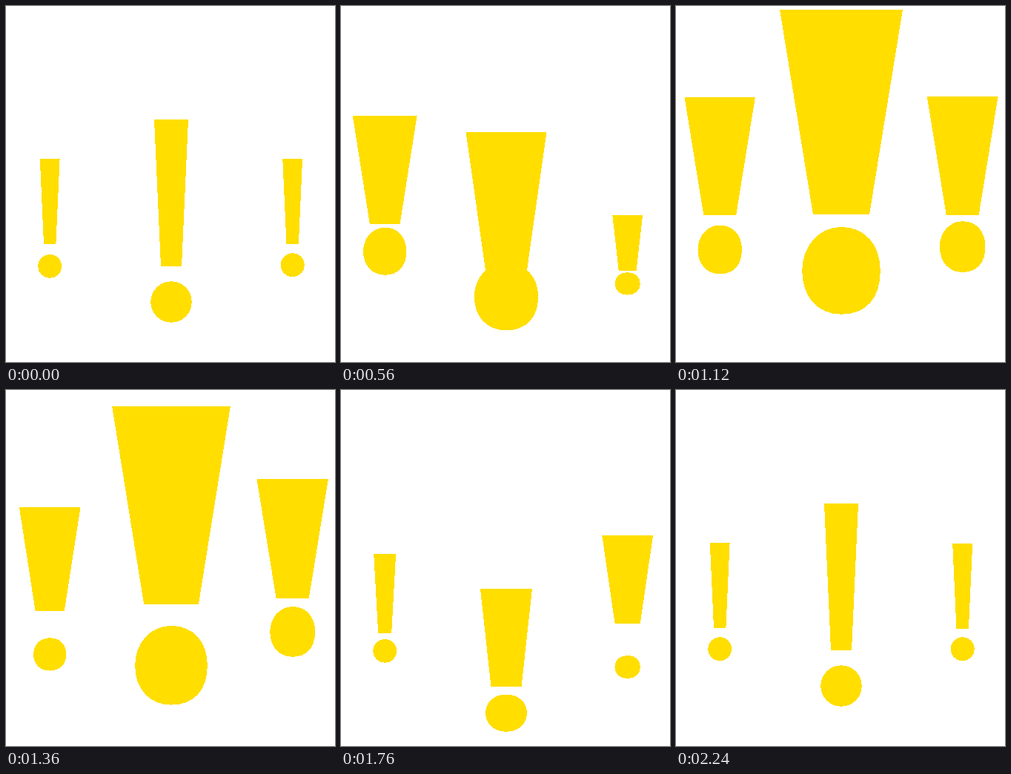
Write an HTML page that moves like this. It is 444 by 480 pixels and loops after 2.32 s.

```html
<!DOCTYPE html>
<html lang="en">
<head>
<meta charset="utf-8">
<title>Bouncing exclamation marks</title>
<style>
  html, body { margin: 0; width: 100%; height: 100%; overflow: hidden; background: #fff; }
  svg { display: block; width: 100%; height: 100%; }
  path { fill: #ffde00; shape-rendering: crispEdges; }
</style>
</head>
<body>
<svg viewBox="0 0 444 480"></svg>
<script>
const LOOP = 2320, STEP = 80, STAGGER = 160, DOT_LEAD = 80;
const SIDE_SCALE = 0.583, SIDE_Y = 116.6;

const bar = {
  rest:   { top: 153, bottom: 351, width: 46, foot: 28 },
  crouch: { top: 283, bottom: 412, width: 70, foot: 41 },
  tall:   { top: 4.7, bottom: 281.2, width: 166, foot: 76 },
  land:   { top: 268, bottom: 400, width: 70, foot: 41 },
  settle: 0
};

const dotCrouch = { y: 447, width: 56, height: 48.6, round: 0.6, lean: 0 };
const dot = {
  rest:   { y: 399, width: 55.5, height: 55.5, round: 0.552, lean: 0 },
  crouch: dotCrouch,
  tall:   { y: 356.2, width: 106, height: 118.3, round: 0.6, lean: 0.035 },
  land:   dotCrouch,
  settle: 0.1
};

// A bounce: wind up, leap, fall, recover. Falling moves speed up, the others slow down.
const moves = [
  { from: "rest",   to: "crouch", start: 0,    end: 240,  falling: true },
  { from: "crouch", to: "tall",   start: 240,  end: 960,  falling: false },
  { from: "tall",   to: "land",   start: 960,  end: 1600, falling: true },
  { from: "land",   to: "rest",   start: 1600, end: 2000, falling: false }
];

const wrap = time => ((time % LOOP) + LOOP) % LOOP;
const mix = (a, b, k) => a + (b - a) * k;

// Cubic Bezier easing with control points (0.33, 0) and (settle, 1).
function easeOut(u, settle) {
  let low = 0, high = 1;
  for (let i = 0; i < 24; i++) {
    const s = (low + high) / 2, r = 1 - s;
    const x = s * r * r + 3 * s * s * r * settle + s * s * s;
    if (x < u) low = s; else high = s;
  }
  return low * low * (3 - 2 * low);
}

function poseAt(part, time) {
  const move = moves.find(({ end }) => time < end);
  if (!move) return part.rest;
  const u = (time - move.start) / (move.end - move.start);
  const k = move.falling ? 1 - easeOut(1 - u, part.settle) : easeOut(u, part.settle);
  const from = part[move.from], to = part[move.to], pose = {};
  for (const key in from) pose[key] = mix(from[key], to[key], k);
  return pose;
}

const barPath = ({ top, bottom, width, foot }) =>
  `M${-width / 2} ${top}H${width / 2}L${foot / 2} ${bottom}H${-foot / 2}Z`;

// Four quarter curves, clockwise from the top; lean fills the lower right.
function dotPath({ y, width, height, round, lean }) {
  const rx = width / 2, ry = height / 2;
  const point = (px, py) => `${px * rx} ${y + py * ry} `;
  let d = "M" + point(0, -1), ax = 0, ay = -1;
  for (const k of [round, round + lean, round, round - lean]) {
    const bx = -ay, by = ax;
    d += "C" + point(ax + k * bx, ay + k * by) + point(bx + k * ax, by + k * ay) + point(bx, by);
    [ax, ay] = [bx, by];
  }
  return d + "Z";
}

const svg = document.querySelector("svg");
const paths = [59.2, 223, 386.7].map((x, i) => {
  const path = document.createElementNS("http://www.w3.org/2000/svg", "path");
  const [y, scale] = i === 1 ? [0, 1] : [SIDE_Y, SIDE_SCALE];
  path.setAttribute("transform", `translate(${x} ${y}) scale(${scale})`);
  return svg.appendChild(path);
});

function draw(time) {
  const held = Math.floor((time % LOOP) / STEP) * STEP;
  paths.forEach((path, i) => {
    const local = held - i * STAGGER;
    path.setAttribute("d",
      barPath(poseAt(bar, wrap(local))) + dotPath(poseAt(dot, wrap(local + DOT_LEAD))));
  });
}

const start = performance.now();
function tick() {
  draw(performance.now() - start);
  requestAnimationFrame(tick);
}
tick();
</script>
</body>
</html>
```
